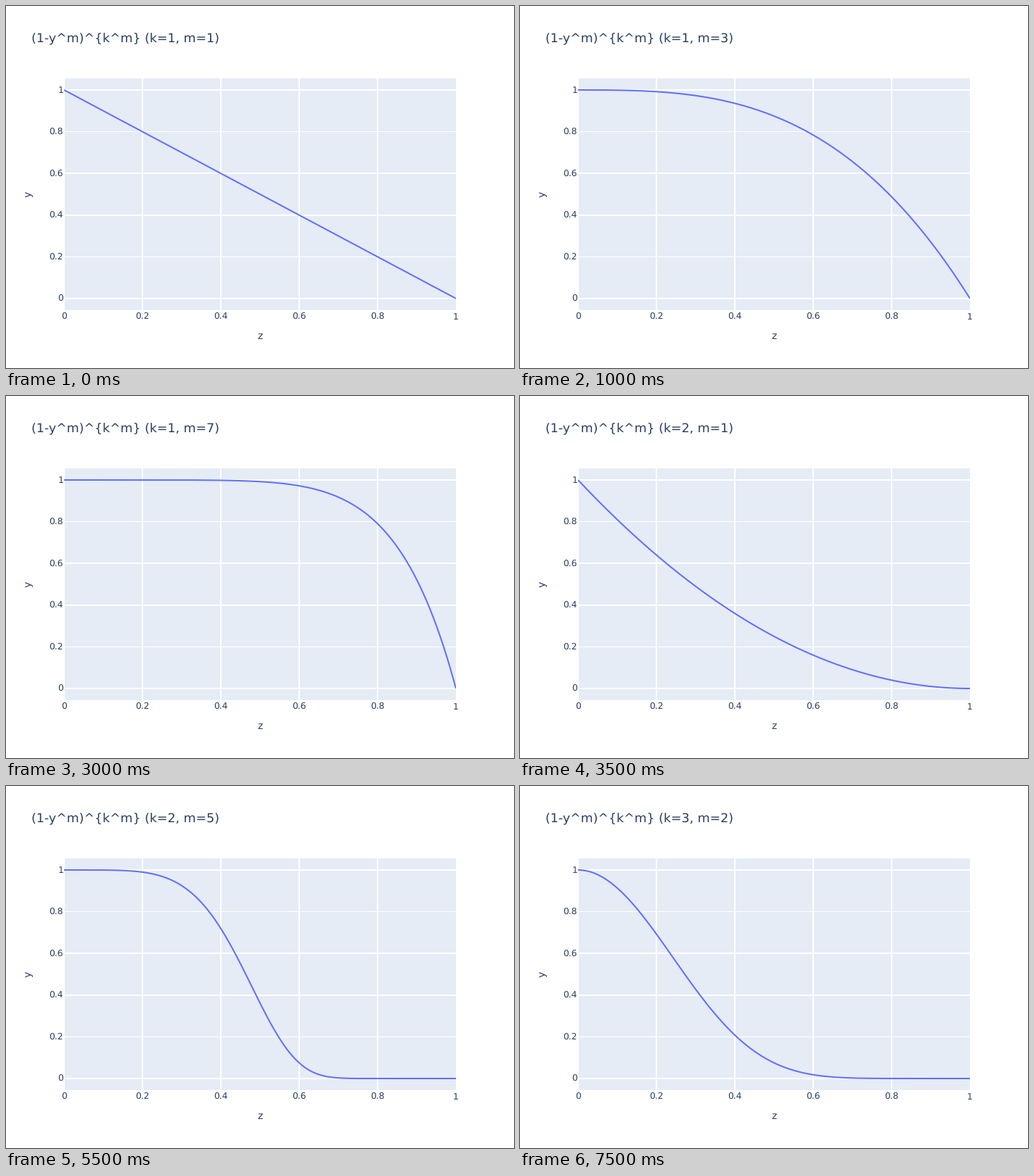
Write a matplotlib script that moves like this. It is 700 px wide and 500 px high and loops after 8 s.

```python
import numpy as np
import matplotlib.pyplot as plt
from matplotlib.animation import FuncAnimation
from matplotlib.patches import Rectangle

W, H, DPI = 700, 500, 100
LEFT, RIGHT, TOP, BOTTOM = 80, 620, 100, 420
Y_ONE, Y_ZERO = 116, 404
PAPER, PLOT, GRID = "#ffffff", "#e5ecf6", "#ffffff"
INK, CURVE = "#2a3f5f", "#636efa"
M_STEPS, FRAMES, INTERVAL = 7, 16, 500

plt.rcParams["font.family"] = "DejaVu Sans"
plt.rcParams["text.hinting"] = "none"


def pt(px):
    return px * 72 / DPI


def to_x(v):
    return LEFT + (RIGHT - LEFT) * v


def to_y(v):
    return Y_ZERO + (Y_ONE - Y_ZERO) * v


fig = plt.figure(figsize=(W / DPI, H / DPI), dpi=DPI, facecolor=PAPER)
ax = fig.add_axes([0, 0, 1, 1])
ax.set_xlim(0, W)
ax.set_ylim(H, 0)
ax.axis("off")


def box(x0, y0, x1, y1, color):
    patch = Rectangle((x0, y0), x1 - x0, y1 - y0, facecolor=color, linewidth=0)
    return ax.add_patch(patch)


def label(x, y, text, size, ha="center", **kw):
    return ax.text(x, y, text, fontsize=pt(size), color=INK, ha=ha,
                   va="baseline", parse_math=False, **kw)


area = box(LEFT, TOP, RIGHT, BOTTOM, PLOT)

for i in range(6):
    v = i / 5
    x, y = to_x(v), to_y(v)
    if i < 5:
        box(x - 1, TOP, x + 1, BOTTOM, GRID)
    # grid rows off the pixel grid render one pixel thick
    if i in (1, 4):
        box(LEFT, np.floor(y), RIGHT, np.floor(y) + 1, GRID)
    else:
        box(LEFT, round(y) - 1, RIGHT, round(y) + 1, GRID)
    label(x, 433, f"{v:g}", 12.2)
    label(79, y + 4.2, f"{v:g}", 12.2, ha="right")

label(350, 460, "z", 14)
label(34.7, 260, "y", 14, rotation=90, rotation_mode="anchor")
title = label(35, 50, "", 17.4, ha="left")

z = np.linspace(0, 1, 601)
curve, = ax.plot([], [], color=CURVE, linewidth=pt(2), solid_capstyle="butt",
                 solid_joinstyle="round", zorder=3)
curve.set_clip_path(area)


def draw(i):
    k, m = i // M_STEPS + 1, i % M_STEPS + 1
    title.set_text(f"(1-y^m)^{{k^m}} (k={k}, m={m})")
    curve.set_data(to_x(z), to_y((1 - z**m) ** (k**m)))
    return curve, title


anim = FuncAnimation(fig, draw, frames=FRAMES, interval=INTERVAL,
                     repeat=True, repeat_delay=0, blit=False)
plt.show()
```
